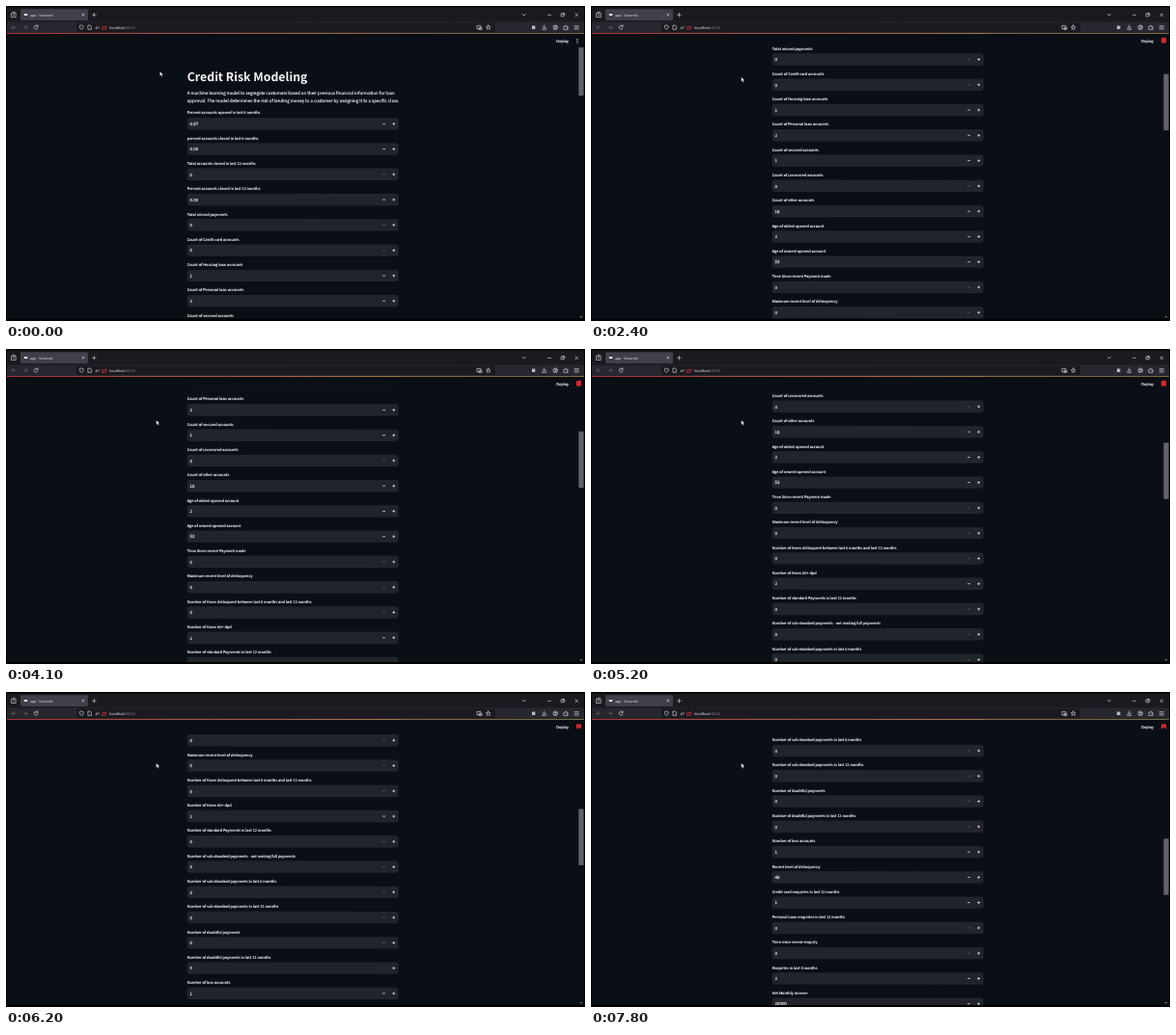
Recreate the animation shown at these times as an HTML page. Size 600 by 327 pixels, loop 8000 ms.

```html
<!DOCTYPE html>
<html lang="en">
<head>
<meta charset="utf-8">
<title>Credit Risk Modeling</title>
<style>
  html, body { margin: 0; width: 100%; height: 100%; overflow: hidden; background: #000; }
  svg { display: block; width: 600px; height: 327px; }
  text { font-family: "Noto Sans CJK JP", "Noto Sans CJK SC", "Noto Sans", sans-serif; fill: #f4f5f7; text-rendering: geometricPrecision; white-space: pre; }
  .small { stroke: #f4f5f7; stroke-width: .13; }
  .ui { font-family: "Open Sans", "Noto Sans", sans-serif; }
  .icon { fill: none; stroke: #d4d4d9; stroke-width: .65; stroke-linecap: round; stroke-linejoin: round; }
  .dim { stroke: #6a6972; }
</style>
</head>
<body>
<svg id="stage" viewBox="0 0 600 327" xmlns="http://www.w3.org/2000/svg">
  <defs>
    <linearGradient id="stripe">
      <stop offset="0" stop-color="#d93a3e"/>
      <stop offset="1" stop-color="#d3c260"/>
    </linearGradient>
    <clipPath id="page"><rect x="1" y="28" width="598" height="297"/></clipPath>
  </defs>
  <rect width="600" height="327"/>
  <g clip-path="url(#page)">
    <rect x="1" y="28" width="598" height="297" fill="#0a0e15"/>
    <g id="content">
      <text x="187.8" y="78" font-size="12.3" font-weight="700">Credit Risk Modeling</text>
      <text class="small" x="187.8" y="92.2" font-size="4.48">A machine learning model to segregate customers based on their previous financial information for loan</text>
      <text class="small" x="187.8" y="100.1" font-size="4.48">approval. The model determines the risk of lending money to a customer by assigning it to a specific class.</text>
    </g>
    <rect id="thumb" x="593.4" y="34.6" width="5.2" height="58.4" fill="#62646a"/>
    <path d="M594.5 322h3l-1.5 1.6z" fill="#8a8b90"/>
    <rect x="1" y="28" width="598" height="15" fill="#0a0e15"/>
    <text class="small" x="570.3" y="37.5" font-size="3.92" transform="rotate(.01)">Deploy</text>
    <g id="dots" fill="#f4f5f7">
      <circle cx="592" cy="34.3" r=".6"/><circle cx="592" cy="36.2" r=".6"/><circle cx="592" cy="38.1" r=".6"/>
    </g>
    <path id="mark" fill="#d2262f"/>
  </g>
  <g transform="rotate(.01)">
    <rect x="1" y="1.5" width="598" height="15" fill="#1b1a21"/>
    <rect x="1" y="16.2" width="598" height="12.1" fill="#28272f"/>
    <rect x="1" y="28.3" width="598" height=".7" fill="url(#stripe)"/>
    <rect x="15" y="3.2" width="70" height="11.7" rx="1.3" fill="#403f4a"/>
    <rect x="73" y="17.3" width="434" height="9.7" rx="1.3" fill="#1b1a21"/>
    <rect x="18.8" y="8" width="3.4" height="2" fill="#e8e8ea"/>
    <text class="ui" x="25" y="10.5" font-size="3.5">app · Streamlit</text>
    <text class="ui" x="92.6" y="23.5" font-size="3.7">#T</text>
    <text class="ui" x="107.2" y="23.7" font-size="4">localhost<tspan fill="#85848d">:8502</tspan></text>
    <rect x="545" y="20.4" width="3.4" height="3.4" fill="#b9b9bf"/>
    <g class="icon">
      <path d="M5.8 7.5h4.4v4h-4.4zM6.7 6.2h2.6M7.2 9.4h1.6"/>
      <path d="M78.9 8l2 2m0-2l-2 2M89.6 9.2h3.6m-1.8-1.8v3.6"/>
      <path d="M535.4 8.3l1.6 1.6 1.6-1.6M561.5 9.2h3.2M575.5 8h2.6v2.6h-2.6zM576.3 7.3h2.5v2.4M589.9 7.8l2.8 2.8m0-2.8l-2.8 2.8"/>
      <path class="dim" d="M10 22.2h-4m1.7-1.7L6 22.2l1.7 1.7M18 22.2h4m-1.7-1.7l1.7 1.7-1.7 1.7"/>
      <path d="M32.8 21a2 2 0 1 0 .2 1.9M33 19.8v1.5h-1.5"/>
      <path d="M78.3 20l1.9.7c0 2-.5 3-1.9 3.8-1.4-.8-1.9-1.8-1.9-3.8zM85.3 20h2l1.1 1.1v3.2h-3.1z"/>
      <path stroke="#c9343c" d="M100 21.5h3.8v2.6H100zm0 3.1l4-4.4"/>
      <path d="M488.4 20.3h3.6v3.4h-3.6zM490.6 22.2h2.5v2.1h-2.5z"/>
      <path d="M499.8 19.8l.7 1.5 1.6.2-1.2 1.1.3 1.7-1.4-.8-1.4.8.3-1.7-1.2-1.1 1.6-.2z"/>
      <path d="M557.8 19.8v3m-1.3-1.2l1.3 1.3 1.3-1.3M555.9 23.2v1.1h3.8v-1.1"/>
      <circle cx="569.3" cy="22.1" r="2.3"/><circle cx="569.3" cy="21.5" r=".7"/><path d="M567.9 23.6q1.4-1.2 2.8 0"/>
      <path d="M578.3 21.2h1.1c-.4-1.7 1.9-1.7 1.5 0h1.3v1.1c-1.4-.3-1.4 1.1 0 .8v1.2h-3.9z"/>
      <path d="M589.2 20.5h4.2m-4.2 1.7h4.2m-4.2 1.7h4.2"/>
    </g>
  </g>
  <path id="cursor" d="M0 0v5l1.15-1.05.8 1.8.9-.4-.8-1.75h1.6z" fill="#fff" stroke="#000" stroke-width=".35"/>
</svg>
<script>
const $ = id => document.getElementById(id);
const LOOP = 8000, FRAME = 100;
const PITCH = 26.27, TICK = 37.36;

const fields = [
  ["Percent accounts opened in last 6 months", "0.67"],
  ["percent accounts closed in last 6 months", "0.00"],
  ["Total accounts closed in last 12 months", "0"],
  ["Percent accounts closed in last 12 months", "0.00"],
  ["Total missed payments", "0"],
  ["Count of Credit card accounts", "0"],
  ["Count of Housing loan accounts", "1"],
  ["Count of Personal loan accounts", "2"],
  ["Count of secured accounts", "1"],
  ["Count of unsecured accounts", "0"],
  ["Count of other accounts", "18"],
  ["Age of oldest opened account", "2"],
  ["Age of newest opened account", "53"],
  ["Time Since recent Payment made", "0"],
  ["Maximum recent level of delinquency", "0"],
  ["Number of times delinquent between last 6 months and last 12 months", "0"],
  ["Number of times 60+ dpd", "2"],
  ["Number of standard Payments in last 12 months", "0"],
  ["Number of sub standard payments - not making full payments", "0"],
  ["Number of sub standard payments in last 6 months", "0"],
  ["Number of sub standard payments in last 12 months", "0"],
  ["Number of doubtful payments", "0"],
  ["Number of doubtful payments in last 12 months", "0"],
  ["Number of loss accounts", "1"],
  ["Recent level of delinquency", "46"],
  ["Credit card enquiries in last 12 months", "1"],
  ["Personal Loan enquiries in last 12 months", "0"],
  ["Time since recent enquiry", "0"],
  ["Enquiries in last 3 months", "2"],
  ["Net Monthly Income", "20000"]
];

$("content").insertAdjacentHTML("beforeend", fields.map(([label, value], i) => `
  <g transform="translate(0 ${i * PITCH})">
    <text class="small" x="187.8" y="112.4" font-size="3.92">${label}</text>
    <rect x="187.8" y="116" width="219" height="12.4" rx="2.4" fill="#22242c"/>
    <text class="small" x="190.6" y="124" font-size="4.48">${value}</text>
    <path d="M390.4 122.2h2.6" stroke="${value === "0" ? "#62646b" : "#f4f5f7"}" stroke-width=".75"/>
    <path d="M400.6 122.2h2.6m-1.3-1.3v2.6" stroke="#f4f5f7" stroke-width=".75"/>
  </g>`).join(""));

// Wheel bursts: start, end, wheel ticks reached at the end
const bursts = [
  [1100, 1400, 3], [1600, 1900, 3.8], [2000, 2400, 4.6], [2500, 2700, 5],
  [2800, 3000, 5.28], [3100, 3400, 6], [3900, 4300, 7], [4400, 4800, 8],
  [5500, 5900, 10], [6000, 6200, 11.07], [6300, 6500, 11.6], [6600, 6900, 12.6],
  [7000, 7100, 13], [7200, 7400, 14], [7500, 7800, 15]
];

function scrollAt(t) {
  let ticks = 0;
  for (const [start, end, reached] of bursts) {
    if (t <= start) break;
    ticks += (reached - ticks) * Math.min(1, (t - start) / (end - start));
  }
  return ticks * TICK;
}

// Pointer stops: time, x, y
const stops = [[600, 159.4, 67.8], [700, 158.6, 66.5], [900, 156, 92], [1000, 155.7, 90], [1200, 155.7, 73.7]];

function pointerAt(t) {
  let [t0, x0, y0] = stops[0];
  for (const [t1, x1, y1] of stops) {
    if (t < t1) {
      const k = Math.max(0, (t - t0) / (t1 - t0 || 1));
      return [x0 + (x1 - x0) * k, y0 + (y1 - y0) * k];
    }
    [t0, x0, y0] = [t1, x1, y1];
  }
  return [x0, y0];
}

function markShape(t) {
  if (t < 200) return "";
  if (t < 500) return "M591.5 33.2h4.3v4h-4.3z";
  const flag = [1, 3, 7, 9].includes(t / FRAME % 11);
  return flag ? "M591 33.3h5v4.6h-1.7v-1.2h-1.7v1.6H591z" : "M591 33.6l1.2-.9h3.8v5.2l-1 .7h-4z";
}

function render(time) {
  const t = Math.floor(time % LOOP / FRAME) * FRAME;
  const scroll = scrollAt(t);
  // The tiny rotation keeps small glyphs unhinted
  $("content").setAttribute("transform", `translate(0 ${-scroll}) rotate(.01)`);
  $("thumb").setAttribute("y", 34.6 + scroll * .21);
  $("cursor").setAttribute("transform", `translate(${pointerAt(t)})`);
  $("dots").style.display = t < 200 ? "" : "none";
  $("mark").setAttribute("d", markShape(t));
}

let begin;
function tick(now) {
  begin ??= now;
  render(now - begin);
  requestAnimationFrame(tick);
}
render(0);
requestAnimationFrame(tick);
</script>
</body>
</html>
```
